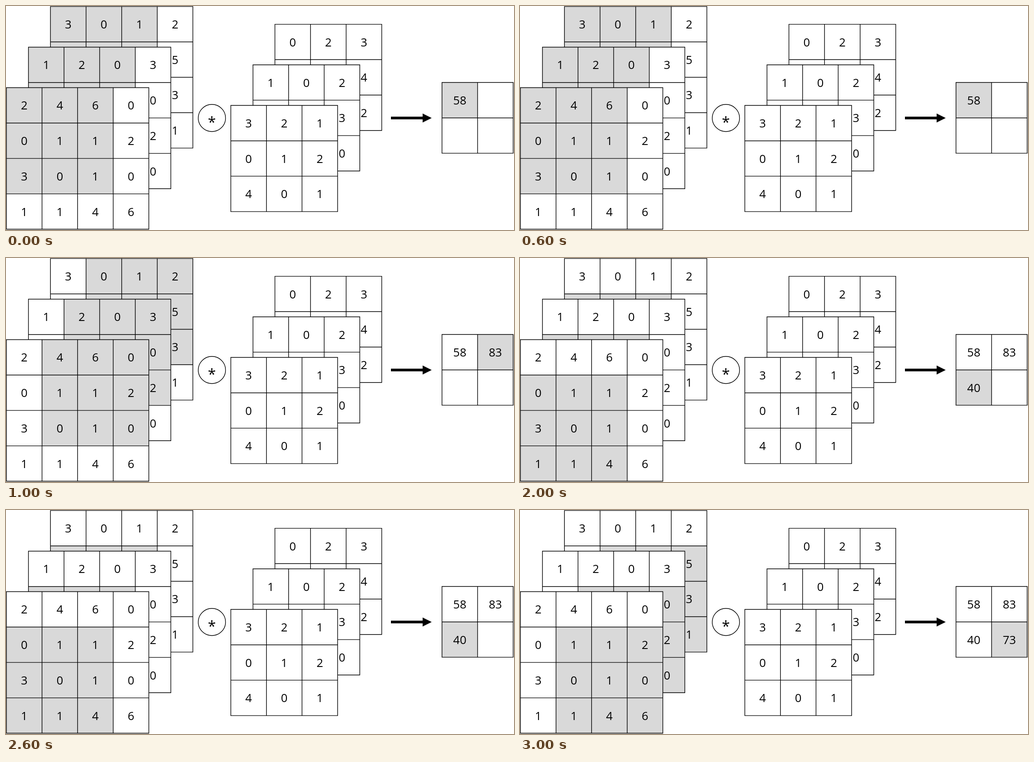
Recreate the animation shown at these times as an HTML page. Size 1123 px wide and 498 px high, loop 4 s.

```html
<!DOCTYPE html>
<html lang="en">
<head>
<meta charset="utf-8">
<title>Convolution over three channels</title>
<style>
  html, body { margin: 0; width: 100%; height: 100%; overflow: hidden; background: #fff; }
  svg { display: block; width: 100vw; height: 100vh; }
  text { font: 25.5px "Open Sans", "Noto Sans", sans-serif; text-anchor: middle; fill: #000; }
  .star { font-size: 32px; }
  .line { fill: none; stroke: #000; stroke-width: 1.4; }
  .paper { fill: #fff; }
  .shade { fill: #d9d9d9; }
</style>
</head>
<body>
<svg id="stage" viewBox="0 0 1123 498"></svg>
<script>
const CELL = 78.7, STEP = 1000;
const stage = document.getElementById('stage');

function add(parent, tag, attrs, text) {
  const el = document.createElementNS('http://www.w3.org/2000/svg', tag);
  for (const key in attrs) el.setAttribute(key, attrs[key]);
  if (text !== undefined) el.textContent = text;
  parent.appendChild(el);
  return el;
}

// Draws a square grid; "." leaves a cell empty. The window covers span x span cells.
function grid(x, y, n, rows, span) {
  const g = add(stage, 'g', { transform: `translate(${x} ${y})` });
  const size = n * CELL;
  add(g, 'rect', { class: 'paper', width: size, height: size });
  const shade = span &&
    add(g, 'rect', { class: 'shade', width: span * CELL, height: span * CELL });
  let d = '';
  for (let i = 0; i <= n; i++) {
    const p = i * CELL;
    d += `M${p} -.7V${size + 0.7}M-.7 ${p}H${size + 0.7}`;
  }
  add(g, 'path', { class: 'line', d });
  const labels = [];
  rows.forEach((row, r) => row.split(' ').forEach((value, c) => {
    if (value === '.') return;
    labels.push(add(g, 'text', { x: (c + 0.5) * CELL, y: (r + 0.5) * CELL + 9.6 }, value));
  }));
  return { shade, labels };
}

const inputs = [
  grid(98.3, 1.1, 4, ['3 0 1 2', '. . . 5', '. . . 3', '. . . 1'], 3),
  grid(49.6, 91.5, 4, ['1 2 0 3', '. . . 0', '. . . 2', '. . . 0'], 3),
  grid(0.9, 181.5, 4, ['2 4 6 0', '0 1 1 2', '3 0 1 0', '1 1 4 6'], 3)
];

add(stage, 'circle', { class: 'line', cx: 455.2, cy: 249, r: 30.2 });
add(stage, 'text', { class: 'star', x: 455.2, y: 270 }, '*');

grid(594.5, 40.6, 3, ['0 2 3', '. . 4', '. . 2']);
grid(546, 130.7, 3, ['1 0 2', '. . 3', '. . 0']);
grid(497, 221, 3, ['3 2 1', '0 1 2', '4 0 1']);

add(stage, 'path', { d: 'M851 246H921V239L941 249L921 259V252H851Z' });

const output = grid(963.8, 170, 2, ['58 83', '40 73'], 1);
const windows = [...inputs, output].map(part => part.shade);

function frame(now) {
  const step = Math.floor(now / STEP) % 4;
  const col = step % 2, row = step >> 1;
  for (const shade of windows) {
    shade.setAttribute('x', col * CELL);
    shade.setAttribute('y', row * CELL);
  }
  output.labels.forEach((label, i) =>
    label.setAttribute('visibility', i <= step ? 'visible' : 'hidden'));
}

const start = performance.now();
function loop() {
  frame(performance.now() - start);
  requestAnimationFrame(loop);
}
loop();
</script>
</body>
</html>
```
